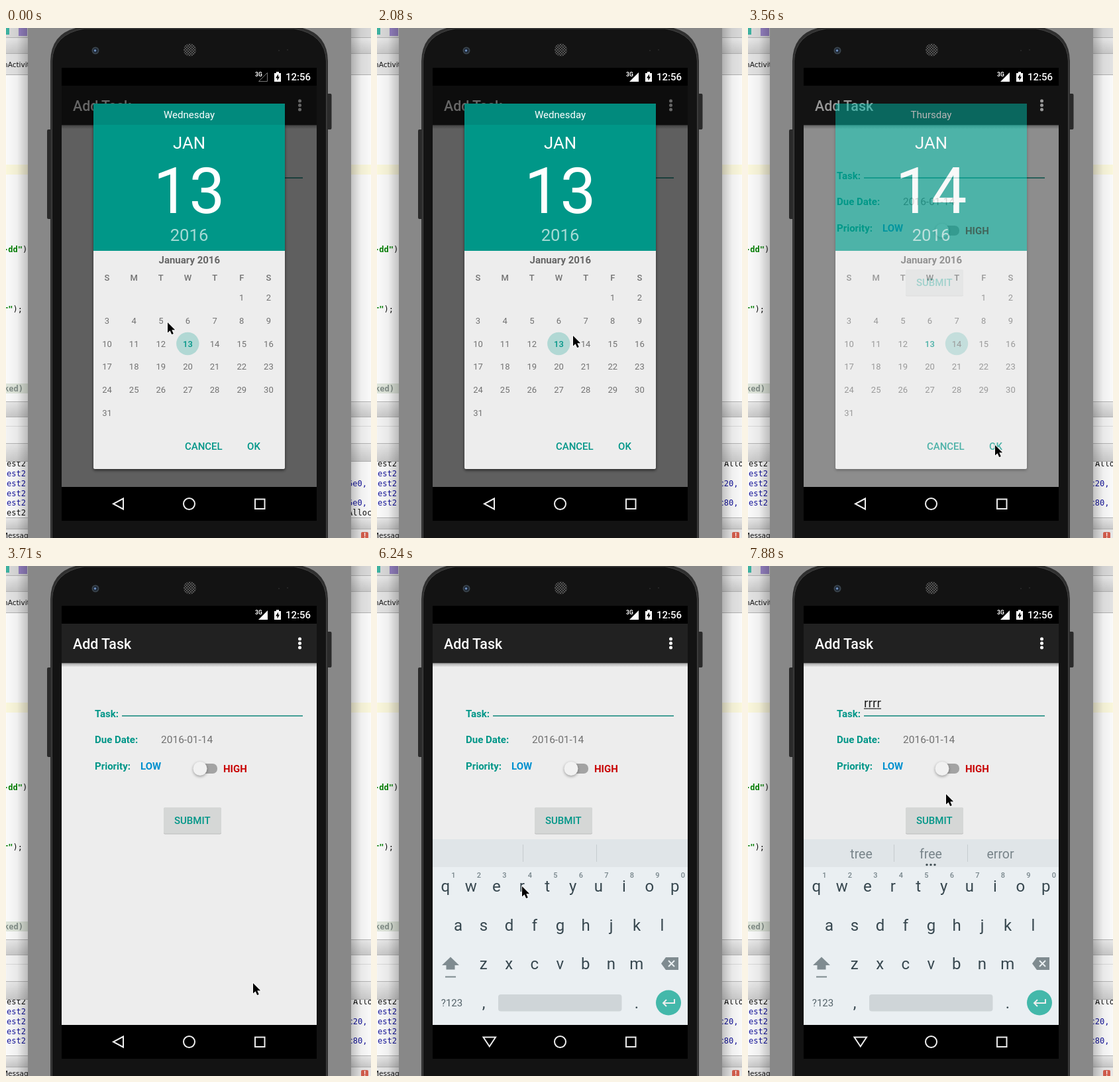
These frames come from a looping animation (551x769 px, 8 s). An HTML page:

```html
<!DOCTYPE html>
<html lang="en">
<head>
<meta charset="utf-8">
<title>Add Task</title>
<style>
html, body { margin: 0; width: 100%; height: 100%; overflow: hidden; background: #888; }
svg { display: block; width: 551px; height: 769px; font: 15px Roboto, sans-serif; }
.mono { font: 12px "DejaVu Sans Mono", monospace; }
.ui { font: 10.5px "DejaVu Sans", sans-serif; fill: #111; }
.mid { text-anchor: middle; }
.b { font-weight: 700; }
.m { font-weight: 500; }
.teal { fill: #009688; }
.line { fill: none; stroke: #eee; stroke-width: 2; }

.anim { animation: 8s step-end infinite; }
.before { animation-name: before; }
.after { animation-name: after; }
.d13 { animation-name: d13; }
.d14 { animation-name: d14; }
.dialog { animation-name: close; animation-timing-function: linear; }
.back { animation-name: back; }
.down { animation-name: down; }
.kbd { animation-name: kbd; animation-timing-function: ease-out; }
.k1 { animation-name: k1; }
.k2 { animation-name: k2; }
.k3 { animation-name: k3; }
.k4 { animation-name: k4; }
.caret { animation-name: caret; }
.mouse { animation-name: mouse; }

@keyframes before { 0% { opacity: 1 } 7.5% { opacity: 0 } }
@keyframes after { 0% { opacity: 0 } 7.5% { opacity: 1 } }
@keyframes d13 { 0% { opacity: 1 } 33.375% { opacity: 0 } }
@keyframes d14 { 0% { opacity: 0 } 33.375% { opacity: 1 } }
@keyframes close { 0%, 43.8% { opacity: 1 } 46%, 100% { opacity: 0 } }
@keyframes back { 0% { opacity: 1 } 63.125% { opacity: 0 } }
@keyframes down { 0% { opacity: 0 } 63.125% { opacity: 1 } }
@keyframes kbd {
  0%, 68.6% { transform: translateY(140px); opacity: 0 }
  70.5%, 100% { transform: none; opacity: 1 }
}
@keyframes k1 { 0% { opacity: 0 } 81.75% { opacity: 1 } }
@keyframes k2 { 0% { opacity: 0 } 83.625% { opacity: 1 } }
@keyframes k3 { 0% { opacity: 0 } 85.5% { opacity: 1 } }
@keyframes k4 { 0% { opacity: 0 } 87.375% { opacity: 1 } }
@keyframes caret {
  0% { opacity: 0 }
  61.25% { opacity: 1 }
  65% { opacity: 0 }
  68.625% { opacity: 1 }
  74.25% { opacity: 0 }
  81.75% { opacity: 1; transform: translateX(6.5px) }
  83.625% { opacity: 1; transform: translateX(13px) }
  85.5% { opacity: 1; transform: translateX(19.5px) }
  87.375% { opacity: 1; transform: translateX(26px) }
  98.5% { opacity: 0 }
}
@keyframes mouse {
  0% { transform: translate(244px, 444px); animation-timing-function: steps(8) }
  14.875% { transform: translate(271px, 442px) }
  26% { transform: translate(296px, 464px) }
  27.875% { transform: translate(304px, 469px) }
  29.75% { transform: translate(308px, 470px) }
  33.375% { transform: translate(308px, 470px); animation-timing-function: steps(5) }
  42.625% { transform: translate(373px, 629px) }
  46.375% { transform: translate(373px, 629px); animation-timing-function: steps(4) }
  53.75% { transform: translate(190px, 175px) }
  55.625% { transform: translate(196px, 196px) }
  57.5% { transform: translate(201px, 211px) }
  66.75% { transform: translate(201px, 211px); animation-timing-function: steps(6) }
  78% { transform: translate(219px, 483px) }
  91% { transform: translate(222px, 478px) }
  92.875% { transform: translate(245px, 450px) }
  94.75% { transform: translate(275px, 410px) }
  96.625% { transform: translate(295px, 365px) }
  98.5%, 100% { transform: translate(299px, 344px) }
}
</style>
</head>
<body>
<svg viewBox="0 0 551 769">
  <defs>
    <linearGradient id="shadeL"><stop offset="0" stop-opacity=".02"/><stop offset=".5" stop-opacity=".06"/><stop offset="1" stop-opacity=".24"/></linearGradient>
    <linearGradient id="shadeR"><stop offset="0" stop-opacity=".24"/><stop offset=".5" stop-opacity=".06"/><stop offset="1" stop-opacity=".02"/></linearGradient>
    <linearGradient id="bar" x2="0" y2="1"><stop offset="0" stop-color="#f0f0f0"/><stop offset="1" stop-color="#cfcfcf"/></linearGradient>
    <linearGradient id="drop" x2="0" y2="1"><stop offset="0" stop-opacity=".3"/><stop offset="1" stop-opacity="0"/></linearGradient>
    <pattern id="mesh" width="4" height="4" patternUnits="userSpaceOnUse"><rect width="4" height="4" fill="#1c1c1c"/><circle cx="1" cy="1" r="1" fill="#666"/><circle cx="3" cy="3" r="1" fill="#666"/></pattern>
    <clipPath id="log"><path d="M0 654H551V738H0Z"/></clipPath>
    <clipPath id="content"><path d="M84 146H469V692H84Z"/></clipPath>
    <filter id="soft" x="-20%" y="-20%" width="140%" height="140%"><feGaussianBlur stdDeviation="2"/></filter>
  </defs>

  <!-- editor window behind -->
  <rect width="551" height="769" fill="#fff"/>
  <rect width="551" height="38" fill="#dedede"/>
  <rect y="14" width="551" height="24" fill="url(#bar)"/>
  <rect y="38" width="551" height="32" fill="#e8e8e8"/>
  <path d="M0 14.5H551M0 38.5H551M0 70.5H551" stroke="#b5b5b5"/>
  <rect width="5" height="10" fill="#3fb5a4"/>
  <rect x="19" width="13" height="12" fill="#9a86c8"/>
  <rect y="206" width="551" height="15" fill="#fffce0"/>
  <rect y="536" width="33" height="15" fill="#e3eadf"/>
  <rect y="563" width="551" height="23" fill="url(#bar)"/>
  <rect y="586" width="551" height="40" fill="#f8f8f8"/>
  <path d="M0 600.5H551" stroke="#ddd"/>
  <rect y="626" width="551" height="28" fill="url(#bar)"/>
  <path d="M0 563.5H551M0 586.5H551M0 626.5H551M0 653.5H551" stroke="#b8b8b8"/>
  <rect y="738" width="551" height="17" fill="url(#bar)"/>
  <rect y="755" width="551" height="14" fill="#ececec"/>
  <path d="M0 738.5H551M0 755.5H551" stroke="#b8b8b8"/>
  <text class="ui" x="-4" y="59">nActivity</text>
  <text class="ui" x="-6" y="769">Messages</text>
  <rect x="536" y="760" width="11" height="10" rx="2" fill="#d9604f"/>
  <text x="541.5" y="769" class="mid b" fill="#fff" font-size="10">!</text>
  <g class="mono b" fill="#008000">
    <text x="-4" y="338">-dd"<tspan fill="#111" font-weight="400">)</tspan></text>
    <text x="-4" y="428">r"<tspan fill="#111" font-weight="400">);</tspan></text>
    <text x="-3" y="548" fill="#84908a">ked) {</text>
  </g>
  <g id="console" class="mono" clip-path="url(#log)"></g>
  <rect width="33" height="769" fill="url(#shadeL)"/>
  <rect x="521" width="30" height="769" fill="url(#shadeR)"/>

  <!-- phone -->
  <rect x="33" width="488" height="769" fill="#888"/>
  <rect x="62" y="153" width="8" height="135" rx="2" fill="#2a2a2a"/>
  <rect x="484" y="99" width="7.5" height="54" rx="2" fill="#2a2a2a"/>
  <path d="M67 780V50Q68 4 116 -2H437Q485 4 486 50V780Z" fill="#2f2f2f"/>
  <path d="M69.500 780V50Q71 9 118 1H435Q482 9 483.500 50V780Z" fill="#131313" stroke="#444"/>
  <circle cx="135" cy="34" r="5.500" fill="#39434b"/>
  <circle cx="135" cy="34" r="3.500" fill="#1a2433"/>
  <circle cx="134.500" cy="34" r="1.800" fill="#6f8fbd"/>
  <circle cx="277.500" cy="33" r="9.500" fill="url(#mesh)"/>
  <path d="M411 34h2M424 33h2" stroke="#252525" stroke-width="2"/>

  <!-- screen -->
  <rect x="84" y="60" width="385" height="683"/>
  <rect x="84" y="146" width="385" height="546" fill="#ededed"/>
  <rect x="84" y="87" width="385" height="59.500" fill="#212121"/>
  <rect x="84" y="146.500" width="385" height="6" fill="url(#drop)"/>
  <text x="101" y="125" class="m" font-size="21.400" fill="#fff">Add Task</text>
  <g fill="#fff"><circle cx="443.500" cy="110" r="2.500"/><circle cx="443.500" cy="116.500" r="2.500"/><circle cx="443.500" cy="123" r="2.500"/></g>

  <g class="b teal">
    <text x="134" y="227.500">Task:</text>
    <text x="134" y="267">Due Date:</text>
    <text x="134" y="306.500">Priority:</text>
    <text x="203" y="306.500" fill="#0090cf" style="fill:#0090cf">LOW</text>
    <text x="328" y="310.500" style="fill:#c80000">HIGH</text>
  </g>
  <rect x="175" y="225" width="273" height="2" fill="#459f96"/>
  <text x="234" y="267" font-size="15.500" fill="#707070">2016-01-14</text>
  <rect x="285" y="298" width="34" height="15" rx="7" fill="#a3a3a3"/>
  <circle cx="293" cy="307" r="10.500" fill="#000" opacity=".35" filter="url(#soft)"/>
  <circle cx="293" cy="305.500" r="10.500" fill="#f1f1f1"/>
  <rect x="238" y="364.500" width="87" height="40" rx="2" fill="#bbb"/>
  <rect x="238" y="364" width="87" height="39.500" rx="2" fill="#d5d7d6"/>
  <text x="281.300" y="389" class="mid m teal">SUBMIT</text>

  <g id="typed" font-size="19.200" fill="#222"></g>
  <rect class="anim caret teal" x="175" y="192" width="2" height="25"/>

  <!-- keyboard -->
  <g clip-path="url(#content)"><g class="anim kbd">
    <rect x="84" y="412" width="385" height="42" fill="#e0e5e8"/>
    <rect x="84" y="454" width="385" height="238" fill="#eaeff2"/>
    <path d="M220.500 420V446M331.500 420V446" stroke="#c6cccf"/>
    <g class="anim k3 mid" font-size="19.500" fill="#78848a">
      <text x="171" y="441">tree</text><text x="276" y="441">free</text><text x="381" y="441">error</text>
      <g fill="#455258"><circle cx="270" cy="450.500" r="1.700"/><circle cx="276" cy="450.500" r="1.700"/><circle cx="282" cy="450.500" r="1.700"/></g>
    </g>
    <g id="keys" class="mid" font-size="24" fill="#37474f"></g>
    <path d="M111 589.500L124 602H117.500V608.500H104.500V602H98Z" fill="#7f8b90"/>
    <rect x="103" y="618.500" width="16" height="2" fill="#7f8b90"/>
    <path d="M429 599.500L436 590H455V609H436Z" fill="#7f8b90"/>
    <path d="M440 595L449 604M449 595L440 604" stroke="#eaeff2" stroke-width="2"/>
    <text x="113" y="664" class="mid" fill="#546269">?123</text>
    <rect x="183" y="646" width="186.500" height="25.500" rx="4" fill="#cfd5d8"/>
    <circle cx="440" cy="658.500" r="19" fill="#43b8aa"/>
    <path d="M449 653V659H432M437 654L432 659L437 664" class="line" stroke="#fff"/>
  </g></g>

  <!-- date dialog -->
  <g class="anim dialog">
    <rect x="84" y="60" width="385" height="632" opacity=".6"/>
    <rect x="132" y="117" width="289" height="550" rx="2" opacity=".6" filter="url(#soft)"/>
    <rect x="132" y="114" width="289" height="551" rx="2" fill="#ededed"/>
    <path d="M132 336V116q0-2 2-2H419q2 0 2 2V336Z" fill="#009788"/>
    <path d="M132 146V116q0-2 2-2H419q2 0 2 2V146Z" fill="#018a7d"/>
    <g class="mid" fill="#fff">
      <text x="276.500" y="182" font-size="25.700">JAN</text>
      <text x="276.500" y="321" font-size="25.700" opacity=".65">2016</text>
      <g class="anim d13"><text x="276.500" y="136">Wednesday</text><text x="276.500" y="279" font-size="96">13</text></g>
      <g class="anim d14"><text x="276.500" y="136">Thursday</text><text x="276.500" y="279" font-size="96">14</text></g>
    </g>
    <text x="276.800" y="355" class="mid b" fill="#666">January 2016</text>
    <circle class="anim d13" cx="274.300" cy="476" r="17.200" fill="#b1d8d4"/>
    <circle class="anim d14" cx="315" cy="476" r="17.200" fill="#b1d8d4"/>
    <g id="days" class="mid" font-size="13" fill="#727272"></g>
    <g class="mid m teal"><text x="298.300" y="636">CANCEL</text><text x="374" y="636">OK</text></g>
  </g>

  <!-- system bars -->
  <g fill="#fff">
    <text x="376" y="73" class="b" font-size="8.500">3G</text>
    <path class="anim before" d="M394.500 67.500V80.500H381.500Z" fill="none" stroke="#777"/>
    <path class="anim after" d="M395 67V81H381Z"/>
    <path d="M405 68h3v-2h4v2h3v13h-10Z"/>
    <path d="M411 69.500L407 75.500H409.500V79.500L413 73.500H411Z" fill="#000"/>
    <text x="422" y="79" class="m">12:56</text>
  </g>
  <g class="line">
    <path class="anim back" d="M177 709.500V725.500L162 717.500Z"/>
    <path class="anim down" d="M160.500 710.500H179L169.800 724.500Z"/>
    <circle cx="276.500" cy="717.500" r="8.500"/>
    <rect x="376" y="710.500" width="14.500" height="14.500"/>
  </g>

  <path class="anim mouse" d="M0 0V15.500L3.600 12.200L6.200 18L8.800 16.900L6.300 11.300H11.200Z" stroke="#fff" stroke-width="1.500" paint-order="stroke"/>
</svg>

<script>
const get = id => document.getElementById(id);
const text = (x, y, s, attrs = '') => `<text x="${x}" y="${y}" ${attrs}>${s}</text>`;

// calendar
const col = i => 152.5 + 40.65 * i;
let html = [...'SMTWTFS'].map((s, i) => text(col(i), 381, s, 'class="m"')).join('');
for (let d = 1; d <= 31; d++) {
  const cell = d + 4;
  html += text(col(cell % 7), 411 + 34.8 * Math.floor(cell / 7), d, d === 13 ? 'class="m teal"' : '');
}
get('days').innerHTML = html;

// keyboard letters
const row = (s, x, y) => [...s].map((c, i) => text(x + 38.5 * i, y, c)).join('');
get('keys').innerHTML = row('qwertyuiop', 103.3, 491) + row('asdfghjkl', 122.5, 550) +
  row('zxcvbnm', 160.8, 608) + text(161, 667, ',') + text(392, 667, '.') +
  [...'1234567890'].map((c, i) =>
    text(115.3 + 38.5 * i, 470, c, 'class="m" font-size="11" fill="#77858b"')).join('');

// typed letters with their composing underline
get('typed').innerHTML = [0, 1, 2, 3].map(i => {
  const x = 175 + 6.5 * i;
  return `<g class="anim k${i + 1}">${text(x, 213, 'r')}<rect x="${x}" y="214.5" width="6.5" height="1.2"/></g>`;
}).join('');

// log lines: left colours by row, then the ends on the right
const ink = ['#111', '#1515a0'];
const log = (cls, rows, ends) => `<g class="anim ${cls}">` +
  [...rows].map((c, i) => text(1, 660.8 + 14.9 * i, 'est2', `fill="${ink[c]}"`)).join('') +
  ends.map(([x, i, s]) => text(x, 660.8 + 14.9 * i, s, `fill="${ink[rows[i]]}"`)).join('') + '</g>';
get('console').innerHTML =
  log('before', '011110', [[516, 2, '6e0,'], [516, 4, '6e0,'], [516, 5, 'Alloc']]) +
  log('after', '01111', [[524, 0, 'Alloc'], [516.5, 2, 'c20,'], [516.5, 4, 'c80,']]);
</script>
</body>
</html>
```
